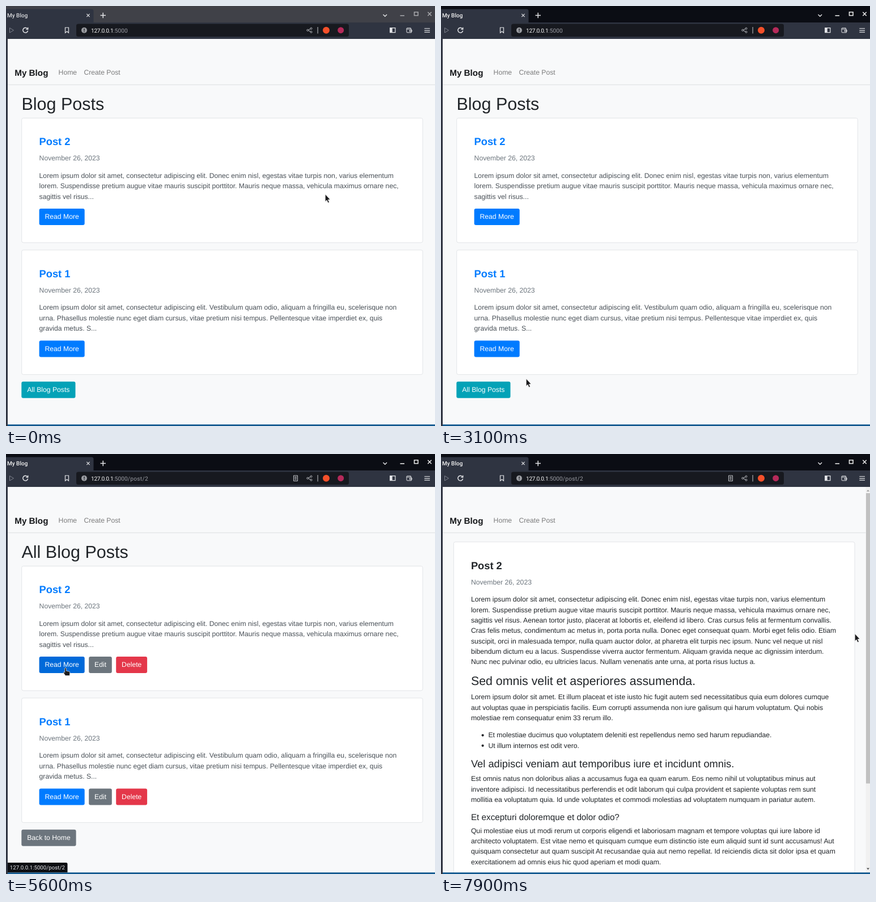
An HTML page that plays this animation: 757x740 px, repeating every 8 s.

```html
<!DOCTYPE html>
<html lang="en">
<head>
<meta charset="utf-8">
<title>My Blog</title>
<style>
html, body { margin: 0; width: 100%; height: 100%; overflow: hidden; background: #f8f9fa; }
svg { display: block; width: 757px; height: 740px; }
text { font-family: "Liberation Sans", Arial, sans-serif; text-rendering: geometricPrecision; white-space: pre; }
.ui { font-family: "Fira Sans", Roboto, "Noto Sans", sans-serif; }
.line { fill: none; stroke: #e4e5e8; stroke-width: 1.2; }
</style>
</head>
<body>
<svg id="stage" viewBox="0 0 757 740" xmlns="http://www.w3.org/2000/svg"></svg>
<script>
const LOOP = 8000, K = 0.7625;
const DARK = '#212529', GREY = '#6c757d', BLUE = '#007bff';
const PAGES = ['list', 'all', 'post'];

const LOREM = [
  'Lorem ipsum dolor sit amet, consectetur adipiscing elit. Donec enim nisl, egestas vitae turpis non, varius elementum',
  'lorem. Suspendisse pretium augue vitae mauris suscipit porttitor. Mauris neque massa, vehicula maximus ornare nec,'
];
const POSTS = [
  ['Post 2', [...LOREM, 'sagittis vel risus...']],
  ['Post 1', [
    'Lorem ipsum dolor sit amet, consectetur adipiscing elit. Vestibulum quam odio, aliquam a fringilla eu, scelerisque non',
    'urna. Phasellus molestie nunc eget diam cursus, vitae pretium nisi tempus. Pellentesque vitae imperdiet ex, quis',
    'gravida metus. S...']]
];
// Blocks of the article: kind, then lines
const ARTICLE = [
  ['p', ...LOREM,
    'sagittis vel risus. Aenean tortor justo, placerat at lobortis et, eleifend id libero. Cras cursus felis at fermentum convallis.',
    'Cras felis metus, condimentum ac metus in, porta porta nulla. Donec eget consequat quam. Morbi eget felis odio. Etiam',
    'suscipit, orci in malesuada tempor, nulla quam auctor dolor, at pharetra elit turpis nec ipsum. Nunc vel neque ut nisl',
    'bibendum dictum eu a lacus. Suspendisse viverra auctor fermentum. Aliquam gravida neque ac dignissim interdum.',
    'Nunc nec pulvinar odio, eu ultricies lacus. Nullam venenatis ante urna, at porta risus luctus a.'],
  ['h3', 'Sed omnis velit et asperiores assumenda.'],
  ['p',
    'Lorem ipsum dolor sit amet. Et illum placeat et iste iusto hic fugit autem sed necessitatibus quia eum dolores cumque',
    'aut voluptas quae in perspiciatis facilis. Eum corrupti assumenda non iure galisum qui harum voluptatum. Qui nobis',
    'molestiae rem consequatur enim 33 rerum illo.'],
  ['ul',
    'Et molestiae ducimus quo voluptatem deleniti est repellendus nemo sed harum repudiandae.',
    'Ut illum internos est odit vero.'],
  ['h4', 'Vel adipisci veniam aut temporibus iure et incidunt omnis.'],
  ['p',
    'Est omnis natus non doloribus alias a accusamus fuga ea quam earum. Eos nemo nihil ut voluptatibus minus aut',
    'inventore adipisci. Id necessitatibus perferendis et odit laborum qui culpa provident et sapiente voluptas rem sunt',
    'mollitia ea voluptatum quia. Id unde voluptates et commodi molestias ad voluptatem numquam in pariatur autem.'],
  ['h5', 'Et excepturi doloremque et dolor odio?'],
  ['p',
    'Qui molestiae eius ut modi rerum ut corporis eligendi et laboriosam magnam et tempore voluptas qui iure labore id',
    'architecto voluptatem. Est vitae nemo et quisquam cumque eum distinctio iste eum aliquid sunt id sunt accusamus! Aut',
    'quisquam consectetur aut quam suscipit At recusandae quia aut nemo repellat. Id reiciendis dicta sit dolor ipsa et quam',
    'exercitationem ad omnis eius hic quod aperiam et modi quam.']
];
const HEAD = { h3: 28, h4: 24, h5: 20 };

const text = (x, y, px, s, fill, more = '') =>
  `<text x="${x}" y="${y}" font-size="${px * K}" fill="${fill}" ${more}>${s}</text>`;
const copy = (x, y, px, s, fill) => text(x, y, px, s, fill, 'class="copy"');
const rect = (x, y, w, h, fill, more = '') =>
  `<rect x="${x}" y="${y}" width="${w}" height="${h}" fill="${fill}" ${more}/>`;
const path = (d, more = 'class="line"') => `<path d="${d}" ${more}/>`;

// Baseline of a line box starting at y; font metrics round to whole page pixels
function base(y, px, lh) {
  const up = Math.round(px * 0.905), down = Math.round(px * 0.212);
  return y + (Math.floor((lh - up - down) / 2) + up) * K;
}

const links = { list: [], all: [], post: [] };

function button(page, x, y, w, label, fill, hover) {
  const id = `${page}-${links[page].length}`;
  links[page].push({ id, x, y, w, h: 29, fill, hover });
  return rect(x, y, w, 29, fill, `id="${id}" rx="3"`) +
    text(x + 13 * K, base(y + 7 * K, 16, 24), 16, label, '#fff');
}

const card = (x, y, w, h) =>
  rect(x + .4, y + .4, w - .8, h - .8, '#fff', 'rx="3" stroke="#dcdfe2" stroke-width=".8"');

const cardHead = (x, y, name, fill) =>
  text(x, base(y, 24, 28.8), 24, name, fill, 'font-weight="700"') +
  text(x, base(y + 40.8 * K, 16, 24), 16, 'November 26, 2023', GREY);

function listPage(page, title) {
  const all = page === 'all';
  let out = text(27.5, base(154.4, 40, 48), 40, title, DARK);
  POSTS.forEach(([name, lines], i) => {
    const top = 197.1 + i * 304.8 * K, x = 58.6;
    const y = top + 41 * K, body = y + 80.8 * K, foot = body + 88 * K;
    out += card(27.3, top, 708.4, 288.8 * K) + cardHead(x, y, name, BLUE);
    lines.forEach((s, n) => out += copy(x, base(body + n * 24 * K, 16, 24), 16, s, '#495057'));
    out += button(page, x, foot, 80.1, 'Read More', BLUE, '#0069d9');
    if (all) {
      out += button(page, 146.2, foot, 40.6, 'Edit', GREY, '#5a6268') +
        button(page, 194.2, foot, 54.9, 'Delete', '#e4374a', '#c82333');
    }
  });
  return out + (all
    ? button(page, 27.3, 661.7, 96.3, 'Back to Home', GREY, '#5a6268')
    : button(page, 27.3, 661.7, 95.2, 'All Blog Posts', '#04a2b7', '#138496'));
}

function postPage() {
  const x = 52.9;
  let y = 154.5 + 41 * K;
  let out = card(22, 154.5, 708.4, 640) + cardHead(x, y, 'Post 2', DARK);
  y += 80.8 * K;
  for (const [kind, ...lines] of ARTICLE) {
    const px = HEAD[kind] || 16, lh = HEAD[kind] ? px * 1.2 : 24;
    for (const s of lines) {
      const b = base(y, px, lh), li = kind === 'ul';
      if (li) out += `<circle cx="73.6" cy="${b - 3.9}" r="2.1" fill="${DARK}"/>`;
      out += copy(li ? x + 40 * K : x, b, px, s, DARK);
      y += lh * K;
    }
    y += (HEAD[kind] ? 8 : 16) * K;
  }
  return out + rect(749.5, 58, 8, 680, '#f1f1f1') + rect(750, 69, 7, 511.5, '#c1c1c1') +
    path('M751 66l2.5-3 2.5 3z', 'fill="#a3a3a3"') + path('M751 729.5l2.5 3 2.5-3z', 'fill="#505050"');
}

function chrome() {
  const x = (cx, cy, r) => `M${cx - r} ${cy - r}l${2 * r} ${2 * r}m0 ${-2 * r}l${-2 * r} ${2 * r}`;
  return rect(0, 0, 757, 30, '#0b0d14', 'id="bar"') +
    path('M0 5.5H151q3.5 0 3.5 3.5V30H0z', 'fill="#2f3441"') +
    rect(0, 29, 757, 29, '#2f3441') + rect(0, 58, 3, 682, '#2f3441') +
    rect(3, 737.3, 754, 2.7, '#10588f') +
    `<text class="ui" id="tab" x="2" y="20" font-size="10" font-weight="500" fill="#f2f2f2">My Blog</text>` +
    path(x(145, 16.5, 2.6)) +
    path('M166.5 16.5h9.5M171.25 11.8v9.5', 'class="line" style="stroke-width:1.5"') +
    path('M665.5 15l3.3 3.3 3.3-3.3', 'class="line" style="stroke-width:1.4"') +
    `<g id="win" fill="none" stroke="#e8e8e8" stroke-width="1.6">` +
    path('M695.5 17h7.5', '') + path('M720.5 10.8h6.5v6h-6.5z', '') + path(x(747.5, 14, 3.2), '') + '</g>' +
    path('M6.5 38.5v8.5l7-4.25z', 'class="line" style="stroke:#7d818c;stroke-width:1"') +
    path('M37.6 39.7a4.4 4.4 0 1 0 1 3.8M38.7 37.8v3.2h-3.3', 'class="line" style="stroke-width:1.4"') +
    path('M104.5 38h6v9.3l-3-2.5-3 2.5z') +
    rect(124, 31.5, 481, 22.5, '#17191f', 'rx="3.5"') +
    '<circle cx="138" cy="42.7" r="5" fill="#9a9ca1"/>' +
    rect(137.4, 39.7, 1.3, 3.8, '#17191f') + rect(137.4, 44.4, 1.3, 1.3, '#17191f') +
    `<text class="ui" x="150" y="46.5" font-size="10.2" fill="#f4f4f4"><tspan letter-spacing="-.35">127.0.0.1</tspan><tspan fill="#9a9ca3">:5000</tspan><tspan id="url" fill="#9a9ca3" letter-spacing=".3"></tspan></text>` +
    `<g id="reader">${path('M507.5 38h7v9.5h-7zM509 40.5h4M509 42.7h4M509 44.9h4', 'class="line" style="stroke:#c4c6ca;stroke-width:1"')}</g>` +
    path('M538.3 39.7l-5.8 3 5.8 3', 'class="line" style="stroke:#b9bbc0;stroke-width:1"') +
    [[538.5, 39.6], [532.3, 42.7], [538.5, 45.8]].map(([cx, cy]) =>
      `<circle cx="${cx}" cy="${cy}" r="1.5" fill="#17191f" stroke="#b9bbc0"/>`).join('') +
    rect(549.6, 37, 1, 11.5, '#c8c9cc') +
    '<circle cx="565" cy="42.7" r="6" fill="#f4502a"/><circle cx="590.7" cy="42.7" r="5.5" fill="#b52a5a"/>' +
    path('M677.7 38.7h9.2v8h-9.2z') + rect(677.7, 38.7, 4, 8, '#e4e5e8') +
    path('M707 40v5.8q0 1 1 1h7.3v-6h-7.3q-1 0-1-1t1-1h6.2v2M712 42.8h4.2v2h-4.2z', 'class="line" style="stroke-width:1"') +
    path('M738.3 39.5h9.7M738.3 42.8h9.7M738.3 46.1h9.7');
}

const nav = text(15.2, 122.7, 20, 'My Blog', '#16181b', 'font-weight="700"') +
  text(92.6, 121.2, 16, 'Home', '#000', 'id="home"') +
  text(137.4, 121.2, 16, 'Create Post', '#000', 'id="create"') +
  rect(3, 138.3, 754, 1, '#dcdfe2');

const CURSORS = {
  arrow: path('M.3-.3v13l2.800-2.600 2.100 4.700 2.200-1-2.100-4.500 3.700-.3z',
    'fill="#1b1b1d" stroke="#fff" stroke-width=".8" stroke-opacity=".75"'),
  hand: path('M-1.3 1q0-1.5 1.3-1.5t1.3 1.5v4l5 1.2q1.6.4 1.5 2l-.5 5.3h-7.6l-3.4-5.2q-.4-1.5 1-1.3l1.4 1z',
    'fill="#1b1b1d" stroke="#fff" stroke-width=".8" stroke-opacity=".8"'),
  beam: path('M-3-6.5q3 0 3 1.5 0-1.5 3-1.5M0-5v10.5M-3 7q3 0 3-1.5 0 1.5 3 1.5',
    'fill="none" stroke="#26282b" stroke-width="1.1"')
};

const stage = document.getElementById('stage');
const group = (id, s) => `<g id="${id}">${s}</g>`;
stage.innerHTML = rect(0, 0, 757, 740, '#f8f9fa') + nav +
  group('list', listPage('list', 'Blog Posts')) +
  group('all', listPage('all', 'All Blog Posts')) +
  group('post', postPage()) + chrome() +
  group('bubble', path('M3 720h10v17.3h-10z', 'id="plate" fill="#0d0e12"') +
    '<text class="ui" id="status" x="6.8" y="732" font-size="9.7" fill="#e6e7e9"></text>') +
  group('pointer', Object.entries(CURSORS).map(([k, s]) => group(k, s)).join(''));

const $ = id => document.getElementById(id);
const show = (id, on) => $(id).setAttribute('visibility', on ? 'visible' : 'hidden');

const copyBoxes = {};
for (const p of PAGES) {
  copyBoxes[p] = [...stage.querySelectorAll(`#${p} .copy`)].map(el => el.getBBox());
}

// Pointer track: time, x, y
const TRACK = [
  [400, 563, 332], [600, 550, 332], [700, 550, 332], [800, 530, 318], [1000, 310, 185],
  [1100, 180, 125], [1200, 120, 110], [1600, 113, 112], [1700, 113, 112], [1900, 172, 114],
  [2000, 235, 155], [2200, 320, 297], [2600, 320, 297], [2800, 298, 370], [3000, 190, 600],
  [3100, 150, 657], [3300, 106, 676], [3500, 98, 679], [4000, 98, 679], [4200, 150, 704],
  [4400, 255, 726], [4600, 278, 716], [4700, 278, 716], [4900, 233, 519], [5100, 150, 405],
  [5300, 110, 378], [5600, 105, 377], [6300, 105, 377], [6600, 162, 265], [6800, 212, 150],
  [7000, 185, 117], [7200, 178, 113], [7300, 205, 122], [7500, 430, 195], [7700, 660, 286],
  [7900, 730, 317]
];
const STATUS = [
  [1300, 1900, ''], [1900, 2100, '/create'], [3400, 3800, '/posts'],
  [3800, 4300, ''], [5300, 6000, '/post/2'], [7100, 7500, '/create']
];

function pointerAt(t) {
  const i = TRACK.findIndex(k => k[0] > t);
  if (i === 0) return TRACK[0].slice(1);
  if (i < 0) return TRACK[TRACK.length - 1].slice(1);
  const [t0, x0, y0] = TRACK[i - 1], [t1, x1, y1] = TRACK[i];
  const f = (t - t0) / (t1 - t0);
  return [x0 + (x1 - x0) * f, y0 + (y1 - y0) * f];
}

function draw(ms) {
  const t = Math.floor(ms / 100) * 100;
  const page = t < 3700 ? 'list' : t < 5700 ? 'all' : 'post';
  for (const p of PAGES) show(p, p === page);

  const idle = t < 200;
  $('bar').setAttribute('fill', idle ? '#404148' : '#0b0d14');
  $('win').setAttribute('stroke', idle ? '#a5a6aa' : '#e8e8e8');
  $('tab').setAttribute('fill', idle ? '#d8d9dc' : '#f2f2f2');
  $('url').textContent = t < 3700 ? '' : t < 5600 ? '/posts' : '/post/2';
  show('reader', t >= 5600);

  const [x, y] = pointerAt(t);
  const inside = b => x >= b.x && x <= b.x + (b.w || b.width) && y >= b.y && y <= b.y + (b.h || b.height);
  const home = inside({ x: 88, y: 102, w: 41, h: 30 });
  const create = inside({ x: 131, y: 102, w: 75, h: 30 });
  $('home').setAttribute('fill-opacity', home ? .7 : .5);
  $('create').setAttribute('fill-opacity', create ? .7 : .5);
  let link = home || create;
  for (const b of links[page]) {
    const over = inside(b);
    $(b.id).setAttribute('fill', over ? b.hover : b.fill);
    link = link || over;
  }
  const kind = link ? 'hand' : copyBoxes[page].some(inside) ? 'beam' : 'arrow';
  for (const c in CURSORS) show(c, c === kind);
  $('pointer').setAttribute('transform', `translate(${x} ${y})`);

  const tip = STATUS.find(([a, b]) => t >= a && t < b);
  show('bubble', !!tip);
  if (tip) {
    $('status').textContent = '127.0.0.1:5000' + tip[2];
    const w = $('status').getComputedTextLength() + 6;
    $('plate').setAttribute('d', `M3 720h${w}q2.5 0 2.5 2.5v14.8H3z`);
  }
}

const start = performance.now();
function tick() {
  draw((performance.now() - start) % LOOP);
  requestAnimationFrame(tick);
}
tick();
</script>
</body>
</html>
```
